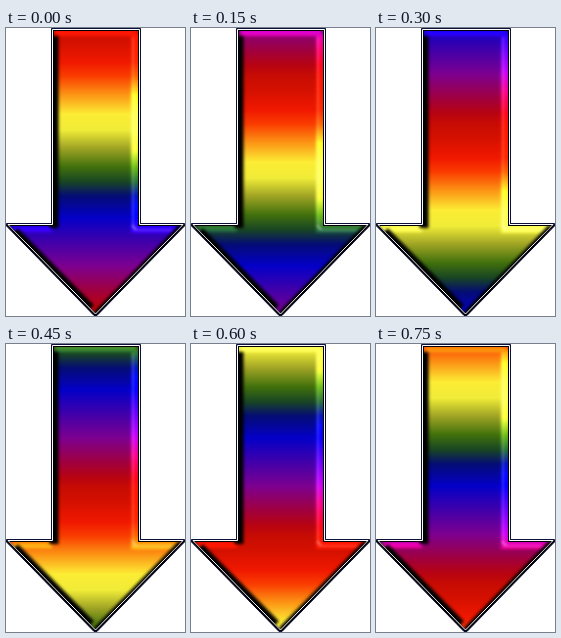
Recreate the animation shown at these times as an HTML page. Size 179 by 288 pixels, loop 900 ms.

```html
<!DOCTYPE html>
<html lang="en">
<head>
<meta charset="utf-8">
<title>Rainbow arrow</title>
<style>
html, body { margin: 0; width: 100%; height: 100%; overflow: hidden; background: #fff; }
svg { display: block; width: 179px; height: 288px; }
.face { isolation: isolate; }
.glow { mix-blend-mode: color-dodge; }
</style>
</head>
<body>
<svg viewBox="0 0 179 288" fill="none">
  <defs>
    <linearGradient id="rainbow" gradientUnits="userSpaceOnUse" x1="0" y1="0" x2="0" y2="288" spreadMethod="repeat"></linearGradient>
    <clipPath id="inside"><path d="M48 3H132V198H175L89.5 285L4 198H48Z"/></clipPath>
    <filter id="soft" filterUnits="userSpaceOnUse" x="-20" y="-20" width="220" height="330" color-interpolation-filters="sRGB">
      <feGaussianBlur stdDeviation="1.8"/>
    </filter>
    <filter id="fine" filterUnits="userSpaceOnUse" x="-20" y="-20" width="220" height="330" color-interpolation-filters="sRGB">
      <feGaussianBlur stdDeviation="0.8"/>
    </filter>
  </defs>
  <path d="M45.5 .5H134.5V195.5H178.5V198L91 287.5H88L.5 198V195.5H45.5Z" fill="#000" stroke="#0c1038"/>
  <path d="M46.5 1.5H133.5V196.5H177L89.5 286L2 196.5H46.5Z" stroke="#fff"/>
  <g class="face" clip-path="url(#inside)">
    <rect width="179" height="288" fill="url(#rainbow)"/>
    <g class="glow" filter="url(#soft)" stroke="#686868">
      <path d="M50 5H130" stroke-width="6"/>
      <path d="M129 6V201H171" stroke-width="8"/>
      <path d="M8 201H46" stroke-width="6"/>
    </g>
    <g filter="url(#soft)" stroke="#000">
      <path d="M48 8V200" stroke-width="9"/>
      <path d="M8 204L84 281" stroke-width="11"/>
      <path d="M175 199L90 286" stroke-width="6"/>
    </g>
    <g filter="url(#fine)" stroke="#fff" stroke-opacity=".2">
      <path d="M127 9V199L131 202H166" stroke-width="1.6"/>
      <path d="M126 197L130 202" stroke-width="3"/>
    </g>
  </g>
</svg>
<script>
const PERIOD = 288, STEPS = 6, HOLD = 150;
const bands = [
  [0, "#c80c04"], [14, "#d41000"], [34, "#f01800"], [48, "#fa3c00"],
  [66, "#fc9214"], [86, "#fcec34"], [102, "#f0ec38"], [120, "#a0a424"],
  [139, "#40700c"], [154, "#184424"], [168, "#040c74"], [190, "#0400c8"],
  [212, "#3c00ac"], [238, "#7c0090"], [262, "#a00040"], [278, "#b80410"],
  [288, "#c80c04"]
];
const rainbow = document.getElementById("rainbow");
for (const [y, color] of bands) {
  const stop = document.createElementNS("http://www.w3.org/2000/svg", "stop");
  stop.setAttribute("offset", y / PERIOD);
  stop.setAttribute("stop-color", color);
  rainbow.append(stop);
}

// The colours jump down one sixth of the cycle at a time.
function draw(ms) {
  const step = Math.floor(ms / HOLD) % STEPS;
  rainbow.setAttribute("gradientTransform", `translate(0 ${step * PERIOD / STEPS})`);
}

const start = performance.now();
function tick() {
  draw(performance.now() - start);
  requestAnimationFrame(tick);
}
draw(0);
requestAnimationFrame(tick);
</script>
</body>
</html>
```
